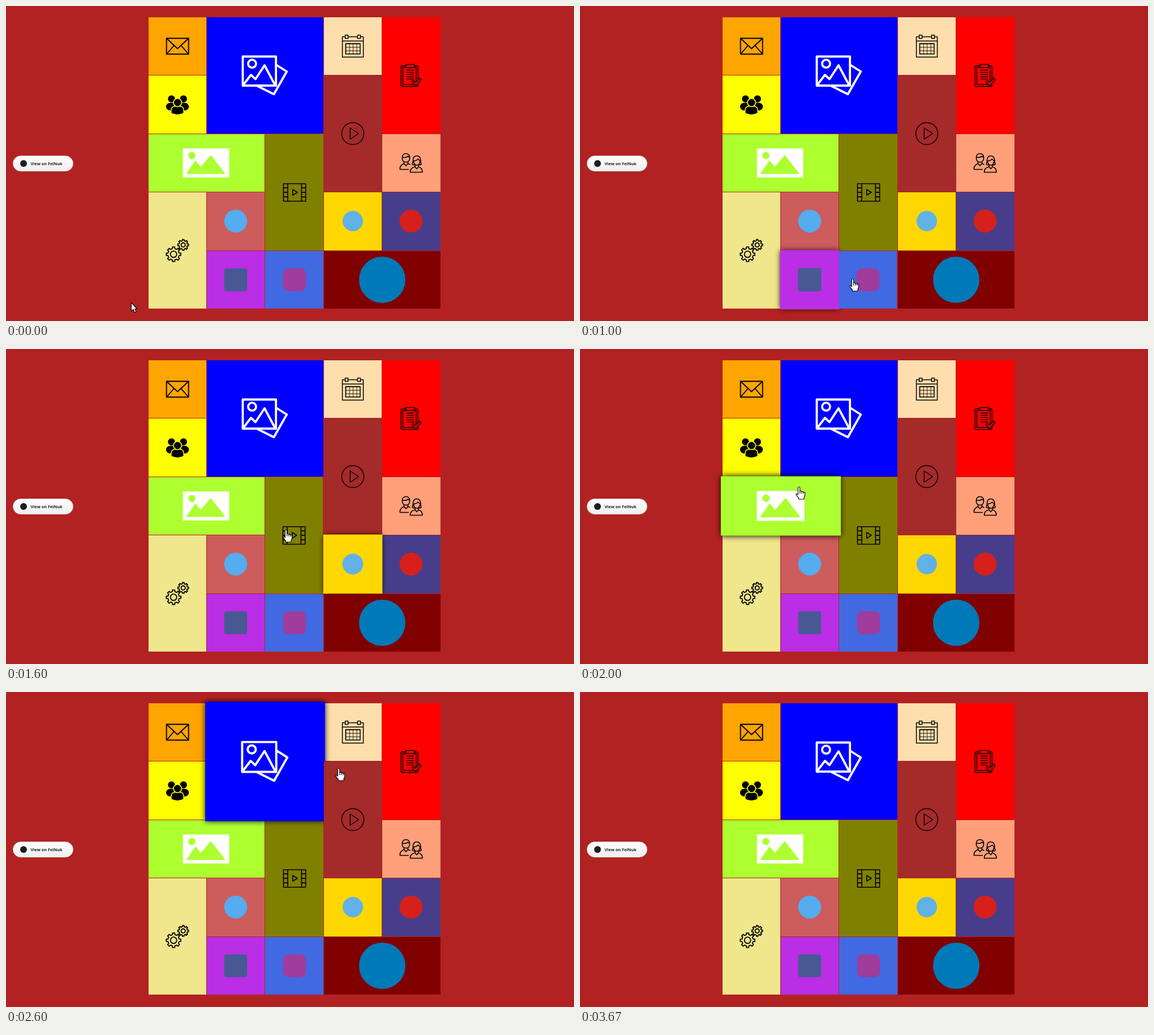
An HTML page for the animation above (4140 ms loop, 1004x558 px).

```html
<!DOCTYPE html>
<html lang="en">
<head>
<meta charset="utf-8">
<title>Tile grid</title>
<style>
html, body { margin: 0; width: 100%; height: 100%; overflow: hidden; background: #b22222; }
.stage { position: relative; width: 1004px; height: 558px; overflow: hidden; }
.grid {
  position: absolute; left: 251.6px; top: 20px;
  display: grid; gap: 1px; grid-auto-flow: dense;
  grid-template: repeat(5, 102.4px) / repeat(5, 102.4px);
}
.tile { position: relative; }
.wide { grid-column: span 2; }
.tall { grid-row: span 2; }
.tile svg { position: absolute; left: 50%; top: 50%; width: 1px; height: 1px; overflow: visible; }
.line { fill: none; stroke: #000; stroke-width: 1.6; stroke-linejoin: round; }
.button {
  position: absolute; left: 12px; top: 265px; width: 106.5px; height: 27.5px; box-sizing: border-box;
  border: 1px solid #e2d6d6; border-radius: 14px; background: linear-gradient(#fff, #eee);
  font: 700 7.3px/27px "Open Sans", "Noto Sans", sans-serif; color: #222;
}
.button i { position: absolute; left: 12px; top: 7px; width: 12px; height: 12px; border-radius: 50%; background: #1b1f24; }
.button span { position: absolute; left: 30.5px; white-space: nowrap; }
.cursor { position: absolute; left: 0; top: 0; width: 30px; height: 30px; overflow: visible; z-index: 5; }
.cursor path { fill: #fff; stroke: #000; stroke-width: 1.1; stroke-linejoin: round; }
</style>
</head>
<body>
<div class="stage">
  <div class="button"><i></i><span>View on FelNuk</span></div>

  <div class="grid">
    <div class="tile" style="background:orange"><svg>
      <g class="line" style="stroke-width:1.9">
        <rect x="-19.3" y="-13.7" width="39" height="28"/>
        <path d="M-19-13.5L.2 4.5L19.5-13.5M-19 14L-6-1M19.5 14L6.4-1"/>
      </g>
    </svg></div>

    <div class="tile wide tall" style="background:blue"><svg>
      <g class="line" style="stroke:#fff;stroke-width:3.8">
        <rect x="-39.5" y="-33.5" width="58.7" height="51.5"/>
        <circle cx="-23" cy="-20.8" r="7"/>
        <path d="M-38 16L-25-1L-17 6.5L-1-18L17 16M20-18.5L38.3-7L15.5 33.3L-14 18.5"/>
      </g>
    </svg></div>

    <div class="tile" style="background:navajowhite"><svg>
      <pattern id="days" x="-12.6" y="-4.4" width="6.4" height="6.1" patternUnits="userSpaceOnUse">
        <path class="line" d="M6.4 0H0V6.1"/>
      </pattern>
      <g class="line" style="stroke-width:1.5">
        <rect x="-18.4" y="-16.5" width="37" height="36"/>
        <path d="M-18.4-9H18.6"/>
        <rect x="-12.6" y="-4.4" width="25.6" height="18.3" style="fill:url(#days)"/>
        <g fill="navajowhite"><rect x="-13.4" y="-19.5" width="5" height="6"/><rect x="8.5" y="-19.5" width="5" height="6"/></g>
      </g>
    </svg></div>

    <div class="tile tall" style="background:red"><svg>
      <g class="line" style="stroke-width:1.5">
        <rect x="-18" y="-17" width="30.4" height="36.5" rx="3"/>
        <rect x="-14.6" y="-14" width="23.6" height="30"/>
        <path d="M-1.5-10.2V7" style="stroke-width:13;stroke-dasharray:1.4 2.6"/>
        <rect x="-9" y="-19.5" width="15" height="5.5" fill="red"/>
        <path d="M1.5 11L4.3 8.5L8 12.5L15 4.5L18 7.3L8.2 18.5Z" fill="red"/>
      </g>
    </svg></div>

    <div class="tile" style="background:yellow"><svg>
      <circle cx="-10.5" cy="-10.5" r="6.2"/><circle cx="10.7" cy="-10.5" r="6.2"/>
      <rect x="-20" y="-3.5" width="40.2" height="13.5" rx="7"/>
      <g stroke="yellow" stroke-width="1.6">
        <path d="M-11.2 15V9.5Q-10.5 2.5-3.5 2.5H4Q10.5 2.5 11.2 9.5V15Q0 21-11.2 15Z"/>
        <circle cx=".2" cy="-4" r="7.2"/>
      </g>
    </svg></div>

    <div class="tile tall" style="background:brown"><svg>
      <g class="line" style="stroke-width:1.4"><circle r="19.5"/><path d="M-4.7-10V10L10.5 0Z"/></g>
    </svg></div>

    <div class="tile wide" style="background:greenyellow"><svg>
      <rect x="-41.3" y="-25.7" width="81.8" height="51.4" fill="#fff"/>
      <g fill="greenyellow"><circle cx="-25.5" cy="-13.2" r="6.4"/><path d="M-35.8 19.6L-19-4.5L-9.8 7L8-14L34 19.6Z"/></g>
    </svg></div>

    <div class="tile tall" style="background:olive"><svg>
      <g class="line">
        <rect x="-19.5" y="-15.3" width="39.2" height="31"/>
        <path d="M-12-15.3V15.7M12.4-15.3V15.7M-3.2-5V5.2L5 0Z"/>
        <path d="M-15.7-8.7V9M16-8.7V9" style="stroke-width:7.5;stroke-dasharray:1.6 6.4"/>
      </g>
    </svg></div>

    <div class="tile" style="background:lightsalmon"><svg>
      <g class="line">
        <rect x="-15.5" y="-16.5" width="13" height="15" rx="6"/>
        <path d="M-15-10Q-8-9-6-12L-2.5-10M-4 11.5H-19.5V9Q-19.5 4.5-12.5 1V-2.5M-5.5-2.5V1L-1.5 3M-12.5 1L-9 5L-5.5 1"/>
        <path d="M7 3Q4.5 4.5 2 2.5Q3.5 0 3.5-4Q3.5-12.5 10-12.5T17-4Q17 0 18 2.5Q15 4.5 12.8 3M4.5-3.5Q10-4 12.5-7L16-3.5Q15 4 10 4T4.5-3.5"/>
        <path d="M7 3.5V7Q-1.5 8.5-1.5 16.5H20Q20 8.5 12.8 7V3.5M7 7L10 10.5L12.8 7"/>
      </g>
    </svg></div>

    <div class="tile tall" style="background:khaki"><svg>
      <g class="line" style="stroke-width:1.8">
        <g transform="translate(-6.8 6.8)"><path data-gear="13"/><circle r="5.6"/></g>
        <g transform="translate(10.2 -9.8)"><path data-gear="9.6"/><circle r="3.7"/></g>
      </g>
    </svg></div>

    <div class="tile" style="background:indianred"><svg><circle r="20.3" fill="#55acee"/></svg></div>
    <div class="tile" style="background:gold"><svg><circle r="18" fill="#62b1e6"/></svg></div>
    <div class="tile" style="background:darkslateblue"><svg><circle r="20.3" fill="#d7201c"/></svg></div>
    <div class="tile" style="background:#ba2ee6"><svg><rect x="-20.2" y="-20.2" width="40.4" height="40.4" rx="4" fill="#475993"/></svg></div>
    <div class="tile" style="background:royalblue"><svg><rect x="-20.2" y="-20.2" width="40.4" height="40.4" rx="10" fill="#a03c9c"/></svg></div>
    <div class="tile wide" style="background:maroon"><svg><circle r="41" fill="#0079b8"/></svg></div>
  </div>

  <svg class="cursor">
    <path id="arrow" d="M.5 .5V15.8L4 12.5L6.4 18L9 16.9L6.6 11.5H11Z"/>
    <g id="hand">
      <path d="M-1.6 13V1.2Q-1.6-.8 0-.8T1.7 1.2V7.2Q3.2 5 4.9 7.8Q6.8 6 8 8.8Q10.6 7.6 10.6 10.2V14.2L9 18.3V21H-.6V18.8L-5 13.2Q-5.6 9.4-1.6 13Z"/>
      <path d="M1.7 7.5V11M4.9 8V11.2M8 9V11.5"/>
    </g>
  </svg>
</div>

<script>
const LOOP = 4140, FRAME = 1000 / 15;
const FADE = 300, GROW = 0.03, LAG = 35;

// Key points of the pointer: time, x, y
const keys = [
  [67, 221, 525], [400, 258, 505], [600, 335, 491], [930, 452, 484], [1000, 482, 484],
  [1270, 593, 464], [1400, 613, 400], [1530, 575, 345], [1600, 495, 321], [1800, 428, 278],
  [2000, 387, 245], [2270, 440, 165], [2600, 588, 136], [2800, 652, 165], [3040, 766, 218],
  [3133, 806, 297], [3333, 904, 477], [3533, 919, 547], [3667, 925, 600]
];

const arrow = document.getElementById('arrow');
const hand = document.getElementById('hand');
const cursor = document.querySelector('.cursor');

function drawGear(el, teeth = 8) {
  const tip = +el.dataset.gear, root = tip * 0.78;
  const points = [];
  for (let i = 0; i < teeth; i++) {
    for (const [turn, r] of [[-0.28, root], [-0.2, tip], [0.2, tip], [0.28, root]]) {
      const a = (i + turn) * 2 * Math.PI / teeth;
      points.push(`${r * Math.cos(a)} ${r * Math.sin(a)}`);
    }
  }
  el.setAttribute('d', 'M' + points.join('L') + 'Z');
}
document.querySelectorAll('[data-gear]').forEach(el => drawGear(el));

// Smooth curve through the key points
function slope(i, axis) {
  const a = keys[Math.max(i - 1, 0)], b = keys[Math.min(i + 1, keys.length - 1)];
  return (b[axis] - a[axis]) / (b[0] - a[0]);
}

function pointAt(t) {
  if (t <= keys[0][0]) return keys[0].slice(1);
  const i = keys.findIndex(k => k[0] >= t);
  if (i < 0) return keys[keys.length - 1].slice(1);
  const a = keys[i - 1], b = keys[i], span = b[0] - a[0], u = (t - a[0]) / span;
  return [1, 2].map(axis =>
    a[axis] + (b[axis] - a[axis]) * u * u * (3 - 2 * u) +
    span * u * (1 - u) * (slope(i - 1, axis) * (1 - u) - slope(i, axis) * u));
}

const inside = (box, [x, y]) => x >= box.left && x < box.right && y >= box.top && y < box.bottom;

// The pointer's path decides when each tile is hovered
const field = document.querySelector('.grid').getBoundingClientRect();
const tiles = [...document.querySelectorAll('.tile')].map(el => {
  const box = el.getBoundingClientRect(), times = [];
  for (let t = 0; t < LOOP; t += 4) if (inside(box, pointAt(t))) times.push(t + LAG);
  return { el, start: times[0], end: times[times.length - 1] };
}).filter(tile => tile.start);

const bezier = (u, a, b) => 3 * u * (1 - u) ** 2 * a + 3 * u * u * (1 - u) * b + u ** 3;

// The CSS "ease" curve
function ease(x) {
  if (x <= 0) return 0;
  if (x >= 1) return 1;
  let lo = 0, hi = 1;
  for (let i = 0; i < 20; i++) {
    const mid = (lo + hi) / 2;
    if (bezier(mid, 0.25, 0.25) < x) lo = mid; else hi = mid;
  }
  return bezier(lo, 0.1, 1);
}

const lift = (t, { start, end }) =>
  ease((Math.min(t, end) - start) / FADE) * (1 - ease((t - end) / FADE));

function draw(t) {
  for (const tile of tiles) {
    const v = lift(t, tile), on = v > 0.01, s = tile.el.style;
    s.transform = on ? `scale(${1 + GROW * v})` : 'none';
    s.boxShadow = on ? `0 0 ${10 * v}px rgba(0,0,0,${v})` : 'none';
    s.zIndex = on ? 1 : 0;
  }
  const [x, y] = pointAt(t), over = inside(field, [x, y]);
  cursor.style.transform = `translate(${Math.round(x)}px,${Math.round(y)}px)`;
  arrow.style.display = over ? 'none' : '';
  hand.style.display = over ? '' : 'none';
}

const begin = performance.now();
function tick() {
  const now = Math.max(0, performance.now() - begin) % LOOP;
  draw(Math.floor((now + 4) / FRAME) * FRAME);
  requestAnimationFrame(tick);
}
tick();
</script>
</body>
</html>
```
